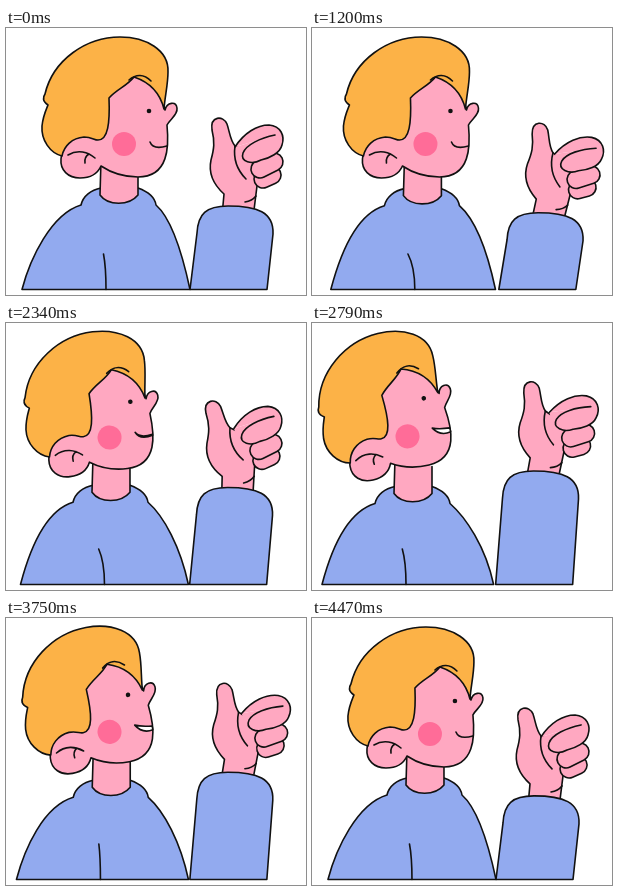
An HTML page with a canvas that plays this animation: 300 by 267 pixels, repeating every 4500 ms.

```html
<!DOCTYPE html>
<html lang="en">
<head>
<meta charset="utf-8">
<title>Thumbs up</title>
<style>
  html, body { margin: 0; width: 100%; height: 100%; overflow: hidden; background: #fff; }
  canvas { display: block; width: 100vw; height: 100vh; }
</style>
</head>
<body>
<canvas id="stage" width="300" height="267"></canvas>
<script>
const ctx = document.getElementById('stage').getContext('2d');
const LOOP = 4500, FLOOR = 261.5;
const INK = '#111', SKIN = '#ffa8c1', HAIR = '#fcb247', BLUSH = '#ff6c98', KNIT = '#92aaef';

// Smooth step from 0 at time a to 1 at time b.
function rise(t, a, b) {
  const u = Math.min(1, Math.max(0, (t - a) / (b - a)));
  return u * u * (3 - 2 * u);
}

// Four overlapping gestures drive every offset from the resting pose.
function poseAt(t) {
  const nudge = rise(t, 0, 1000) - rise(t, 1000, 1900);
  const drift = rise(t, 0, 2000) - rise(t, 3200, 4200);
  const lean = rise(t, 1900, 2780) - 0.18 * rise(t, 2780, 3600) - 0.82 * rise(t, 3600, LOOP);
  const lag = rise(t, 1700, 2250) - rise(t, 2250, 2800);
  return {
    headX: -7 * drift - 10 * lean,
    headY: 8 * lean,
    tilt: -14 * lean,
    collarX: -4 * drift - 8 * lean,
    collarY: drift + 2.5 * lean,
    hem: nudge + 3 * drift - 9 * lean,
    cuffX: 5 * nudge - 0.5 * drift,
    cuffY: 5.5 * nudge + 3 * drift - 33 * lean,
    wristX: 6 * nudge - drift,
    thumb: 8 * nudge + 5 * lean - 6.8 * lag,
    fingers: 10 * nudge + 9 * lean - 5 * lag,
    grin: rise(t, 2100, 2800) - rise(t, 3700, 4400)
  };
}

function shape(d, fill, line = true) {
  const path = new Path2D(d);
  if (fill) {
    ctx.fillStyle = fill;
    ctx.fill(path);
  }
  if (line) ctx.stroke(path);
}

function dot(x, y, r, color) {
  ctx.fillStyle = color;
  ctx.beginPath();
  ctx.arc(x, y, r, 0, Math.PI * 2);
  ctx.fill();
}

function turned(x, y, dx, dy, degrees, draw) {
  ctx.save();
  ctx.translate(x + dx, y + dy);
  ctx.rotate(degrees * Math.PI / 180);
  ctx.translate(-x, -y);
  draw();
  ctx.restore();
}

function drawBody(p) {
  const at = (x, y) => `${x + p.collarX} ${y + p.collarY}`;
  const low = x => x + p.hem;
  const side = 184 + p.collarX * 0.2;
  shape(`M${low(16)} ${FLOOR} C${low(24)} 231 ${at(45, 186)} ${at(75, 177)}
    C${at(77, 168)} ${at(85, 162)} ${at(95, 160)} L${at(132, 160)}
    C${at(143, 164)} ${at(149, 170)} ${at(150, 177)}
    C${at(166, 191)} ${side - 8} 224 ${side} ${FLOOR} Z`, KNIT);
  shape(`M${97.5 + p.collarX * 0.6} 226 Q${low(100)} 239 ${low(100)} ${FLOOR}`);
  shape(`M${at(95, 132)} L${at(94, 167)}
    C${at(102, 178)} ${at(123, 178)} ${at(132, 167)} L${at(132, 140)}`, SKIN);
}

function drawMouth(grin) {
  const upper = `M144 114 Q${147 + 4 * grin} ${122 - 5 * grin} 161 118`;
  if (grin > 0.02) {
    shape(`${upper} V${118 + 4 * grin} Q${147 + 3 * grin} ${122 + 2 * grin} 144 114 Z`, '#fff');
  } else {
    shape(upper);
  }
}

function drawHead(p) {
  shape(`M90 90 L100 40 L150 45 L156 70 L159 82
    C161 74 170 73 171 80 C172 87 164 91 161 97
    C163 118 163 149 132 149 C116 149 104 144 95 138
    C91 147 84 150 74 150 C62 150 54 142 55 131
    C56 116 66 109 78 108 Z`, SKIN);
  shape(`M42 77 C36 73 37 69 39 66 C47 32 80 9 114 9
    C140 9 163 22 162 44 C162 56 159 68 158 81
    C154 65 143 54 128 49 C121 58 111 61 103 70
    C104 95 102 112 92 112 C88 112 86 109 78 109
    C66 110 58 118 56 128 C44 125 35 112 36 98
    C37 88 40 82 42 77 Z`, HAIR);
  shape('M123 52 C130 46 138 46 145 53');
  shape('M62 127 C72 121 82 124 89 130 M83 126 Q78 129 79 135');
  dot(118, 116, 12, BLUSH);
  dot(143, 83, 2.3, INK);
  drawMouth(p.grin);
}

function drawPalm() {
  shape(`M216 188 L218 166 C208 157 202 146 205 132
    C208 121 209 114 206 102 C204 88 217 87 221 96
    C224 105 224 112 229 118 L250 130 L251 158 L247 190`, SKIN);
  shape('M239 174 Q246 173 250 168');
}

function finger(x1, y1, x2, y2, r) {
  const angle = Math.atan2(y2 - y1, x2 - x1);
  ctx.beginPath();
  ctx.arc(x1, y1, r, angle + Math.PI / 2, angle + Math.PI * 1.5);
  ctx.arc(x2, y2, r, angle - Math.PI / 2, angle + Math.PI / 2);
  ctx.closePath();
  ctx.fillStyle = SKIN;
  ctx.fill();
  ctx.stroke();
}

function drawFingers() {
  shape('M229 119 L269 107 L262 150 L240 150 Z', SKIN, false);
  finger(257, 151, 266, 147, 9);
  finger(254, 141, 268, 134, 9);
  shape(`M229 119 C238 105 251 97 263 97 C275 98 279 108 276 117
    C274 125 264 130 255 132 C246 137 234 134 237 125
    C240 117 254 110 269 107`, SKIN);
}

function drawHand(p) {
  const turn = (angle, draw) => turned(232, 179, p.wristX, p.cuffY, angle, draw);
  turn(p.thumb, drawPalm);
  turn(p.fingers, drawFingers);
  turn(p.thumb, () => shape('M229 118 C227 132 231 142 240 151'));
}

function drawSleeve(p) {
  const at = (x, y) => `${x + p.cuffX} ${y + p.cuffY}`;
  const low = x => x + p.cuffX * 0.7;
  shape(`M${low(184)} ${FLOOR} L${at(191, 205)} C${at(192, 186)} ${at(200, 178)} ${at(222, 178)}
    C${at(251, 178)} ${at(268, 184)} ${at(267, 206)} L${low(261)} ${FLOOR} Z`, KNIT);
}

function frame(time) {
  const p = poseAt(time % LOOP);
  ctx.fillStyle = '#fff';
  ctx.fillRect(0, 0, 300, 267);
  ctx.strokeStyle = INK;
  ctx.lineWidth = 1.6;
  ctx.lineCap = ctx.lineJoin = 'round';
  drawBody(p);
  turned(72, 133, p.headX, p.headY, p.tilt, () => drawHead(p));
  drawHand(p);
  drawSleeve(p);
}

const start = performance.now();
function tick() {
  frame(performance.now() - start);
  requestAnimationFrame(tick);
}
tick();
</script>
</body>
</html>
```
